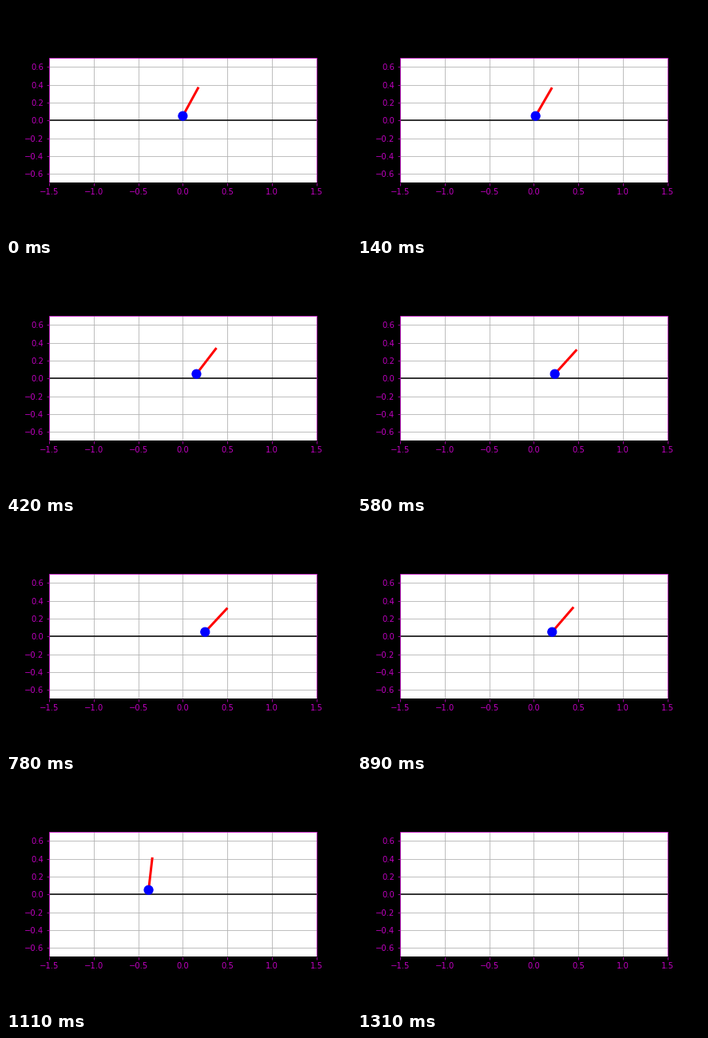
A matplotlib script that plays this animation: 432x288 px, repeating every 8000 ms.

```python
import numpy as np
import matplotlib.pyplot as plt
from matplotlib.animation import FuncAnimation

LOOP_MS = 8000
FRAMES = 290
RADIUS = 0.05   # the cart rolls on the zero line
ROD = 0.355

# Key poses: step, cart position, rod angle from the vertical
POSES = np.array([
    (0, 0, 0.5), (5, 0.02, 0.525), (15, 0.153, 0.655), (28, 0.25, 0.75),
    (36, 0.032, 0.54), (40, -0.384, 0.115), (46, -1.46, -0.9), (50, -2.5, -1.5),
])
STEPS, VALUES = POSES[:, 0], POSES[:, 1:]
SPEEDS = np.gradient(VALUES, STEPS, axis=0, edge_order=2)


def pose(n):
    """Cubic curve through the key poses; holds the last one."""
    n = min(n, STEPS[-1])
    i = np.searchsorted(STEPS[1:-1], n, side="right")
    h = STEPS[i + 1] - STEPS[i]
    s = (n - STEPS[i]) / h
    r = 1 - s
    return (r * r * ((1 + 2 * s) * VALUES[i] + s * h * SPEEDS[i])
            + s * s * ((1 + 2 * r) * VALUES[i + 1] - r * h * SPEEDS[i + 1]))


plt.rcParams.update({"font.family": "DejaVu Sans", "font.size": 10})
fig = plt.figure(figsize=(6, 4), dpi=72, facecolor="black")
fig.subplots_adjust(left=0.125, right=0.9, bottom=0.125, top=0.88)
ax = fig.add_subplot(aspect="equal", xlim=(-1.5, 1.5), ylim=(-0.7, 0.7))
ax.set_xticks(np.arange(-1.5, 1.6, 0.5))
ax.set_yticks(np.arange(-3, 4) * 0.2)
ax.tick_params(colors="m")
ax.spines[["left", "top", "right"]].set_color("m")
ax.grid(color="#b0b0b0", linewidth=0.8)

ax.axhline(0, color="black", lw=1.5)
rod, = ax.plot([], [], "r-", lw=3)
cart = ax.add_patch(plt.Circle((0, RADIUS), RADIUS, color="blue", zorder=3))


def update(n):
    x, angle = pose(n)
    rod.set_data([x, x + ROD * np.sin(angle)],
                 [RADIUS, RADIUS + ROD * np.cos(angle)])
    cart.center = x, RADIUS
    return rod, cart


anim = FuncAnimation(fig, update, frames=FRAMES, init_func=lambda: update(0),
                     interval=LOOP_MS / FRAMES, repeat=True, repeat_delay=0)
plt.show()
```
